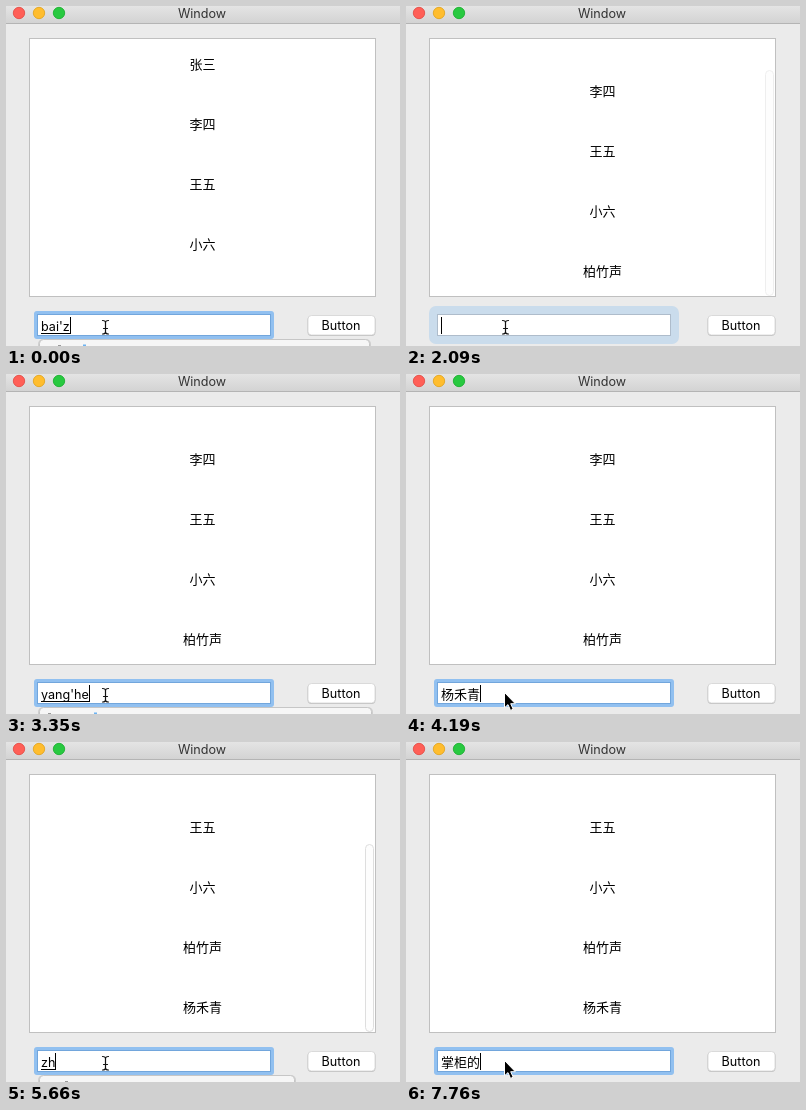
Recreate the animation shown at these times as an HTML page. Size 394 by 340 pixels, loop 7970 ms.

```html
<!DOCTYPE html>
<html lang="zh-CN">
<head>
<meta charset="utf-8">
<title>Window</title>
<style>
html, body { margin: 0; width: 100%; height: 100%; overflow: hidden; background: #ebebeb; }
svg { display: block; }
text { font: 12.6px Inter, "Noto Sans CJK SC", "Noto Sans CJK", sans-serif; fill: #000; }
.cjk { font: 13px "Noto Sans CJK SC", "Noto Sans CJK", sans-serif; }
.mid { text-anchor: middle; }
</style>
</head>
<body>
<svg width="394" height="340" viewBox="0 0 394 340">
  <defs>
    <linearGradient id="bar" x2="0" y2="1">
      <stop offset="0" stop-color="#e4e4e4"/>
      <stop offset="1" stop-color="#d3d3d3"/>
    </linearGradient>
    <clipPath id="view"><rect x="24" y="33" width="345" height="257"/></clipPath>
  </defs>
  <rect width="394" height="340" fill="#ebebeb"/>
  <rect width="394" height="17" fill="url(#bar)"/>
  <rect y="17" width="394" height="1" fill="#b4b4b4"/>
  <g stroke-width=".8">
    <circle cx="13" cy="7" r="5.7" fill="#ff5f57" stroke="#e2463f"/>
    <circle cx="33" cy="7" r="5.7" fill="#ffbd2e" stroke="#e1a116"/>
    <circle cx="53" cy="7" r="5.7" fill="#28c940" stroke="#12ac28"/>
  </g>
  <text class="mid" x="196" y="11.5" style="fill:#333">Window</text>

  <rect x="23.5" y="32.5" width="346" height="258" fill="#fff" stroke="#c0c0c0"/>
  <g clip-path="url(#view)"><g id="rows"></g></g>
  <rect id="knob" x="359.5" width="8" rx="4" fill="#fdfdfd" stroke="#dedede"/>

  <rect x="301.5" y="310" width="68" height="20" rx="4" fill="#c4c4c4"/>
  <rect x="302" y="309.5" width="67" height="19.5" rx="3.5" fill="#fff" stroke="#cfcfcf" stroke-width=".7"/>
  <text class="mid" x="335" y="324">Button</text>

  <rect id="ring"/>
  <rect id="field" x="31.5" y="308.5" width="233" height="21" fill="#fff"/>
  <text id="entry" x="35" y="325"></text>
  <rect id="under" x="35" y="327" height="1"/>
  <rect id="caret" y="311" width="1" height="17"/>

  <g id="popup">
    <rect id="shade" x="32" y="333" height="30" rx="5" fill="#000" opacity=".12"/>
    <rect id="panel" x="33.5" y="333.5" height="30" rx="4" fill="#f6f6f6" stroke="#c6c6c6"/>
    <rect id="dark" y="339" width="3" height="1" fill="#999"/>
    <rect id="blue" y="338.5" width="3" height="1.5" fill="#6db3f2"/>
  </g>

  <g id="beam" fill="none" stroke-linecap="round">
    <path id="beamPath" d="M96.5 314.5Q99.5 314.5 99.5 316.5Q99.5 314.5 102.5 314.5M99.5 316V326M97.5 322.5H101.5M96.5 328Q99.5 328 99.5 326Q99.5 328 102.5 328" stroke="#111" stroke-width="1.2"/>
  </g>
  <path id="arrow" d="M98.5 318.5V333.8L102 330.6L104.5 336.4L107.2 335.2L104.7 329.7H109.3Z" fill="#000" stroke="#fff" stroke-width="1"/>
</svg>
<script>
const LOOP = 7970;
const $ = id => document.getElementById(id);
const set = (el, attrs) => { for (const k in attrs) el.setAttribute(k, attrs[k]); };
const show = (el, on) => el.setAttribute('visibility', on ? 'visible' : 'hidden');

const names = ['张三', '李四', '王五', '小六', '柏竹声', '杨禾青'];
const rows = $('rows');
names.forEach((name, i) => {
  const t = document.createElementNS('http://www.w3.org/2000/svg', 'text');
  set(t, { class: 'cjk mid', x: 196.5, y: 63 + i * 60 });
  t.textContent = name;
  rows.append(t);
});

// Shorthands for the two input modes: composing with a candidate panel, or plain text.
const typing = (text, panel, dark, blue) => ({ text, panel, dark, blue, caret: 1 });
const plain = text => ({ text, panel: 0, caret: 1 });

// Each step keeps what the one before it left unchanged.
const steps = [
  [0, { ...typing("bai'z", 364, 52, 77), scroll: 0, count: 4, knob: 0, ring: 'tight', arrow: 0 }],
  [630, typing("bai'zhu's", 420, 56, 98)],
  [1250, plain(names[4])],
  [1670, { caret: 0 }],
  [1880, { ...plain(''), scroll: 33, count: 5, ring: 'none' }],
  [2090, { ring: 'wide', knob: .5 }],
  [2300, { ring: 'tight', knob: 1 }],
  [2510, { caret: 0 }],
  [2720, typing('ya', 334, 42, 59)],
  [2930, { ...typing('yan', 350, 42, 64), knob: .5 }],
  [3140, { ...typing("yang'h", 345, 42, 76), knob: 0 }],
  [3350, typing("yang'he", 366, 42, 88)],
  [3770, typing("yang'he'q", 420, 42, 102)],
  [4190, { ...plain(names[5]), arrow: 1 }],
  [4820, { caret: 0, arrow: 0 }],
  [5030, { ...plain(''), scroll: 93, count: 6, knob: .5 }],
  [5240, { knob: 1 }],
  [5660, typing('zh', 289, 59, 0)],
  [5870, { ...typing('zhan', 300, 59, 0), knob: .5 }],
  [6080, { ...typing('zhang', 312, 59, 0), knob: 0 }],
  [6290, typing("zhang'g", 320, 59, 0)],
  [6500, typing("zhang'gu", 324, 59, 0)],
  [6710, { text: "zhang'gui" }],
  [7130, { caret: 0 }],
  [7550, plain('掌柜的')],
  [7760, { arrow: 1 }]
];

const rings = {
  tight: { x: 28, y: 305, width: 240, height: 28, rx: 3, fill: '#91c0f0', edge: '#72a6dc' },
  wide: { x: 23, y: 300, width: 250, height: 38, rx: 7, fill: '#cadcec', edge: '#aebccb' },
  none: { x: 31, y: 308, width: 234, height: 22, rx: 0, fill: '#ebebeb', edge: '#b9b9b9' }
};

function draw(time) {
  const s = {};
  for (const [at, change] of steps) if (at <= time) Object.assign(s, change);

  rows.setAttribute('transform', `translate(0 ${-s.scroll})`);
  [...rows.children].forEach((row, i) => show(row, i < s.count));
  const top = s.count > 5 ? 102.5 : 64.5;
  set($('knob'), { y: top, height: 289.5 - top, opacity: s.knob });

  const { edge, ...ring } = rings[s.ring];
  set($('ring'), ring);
  $('field').setAttribute('stroke', edge);

  const entry = $('entry');
  entry.textContent = s.text;
  entry.setAttribute('class', s.panel ? '' : 'cjk');
  const width = s.text ? Math.round(entry.getComputedTextLength()) : 0;
  $('under').setAttribute('width', s.panel ? width : 0);
  $('caret').setAttribute('x', 35 + width);
  show($('caret'), s.caret);

  $('popup').setAttribute('display', s.panel ? 'inline' : 'none');
  if (s.panel) {
    $('shade').setAttribute('width', s.panel - 31);
    $('panel').setAttribute('width', s.panel - 34);
    $('dark').setAttribute('x', s.dark);
    $('blue').setAttribute('x', s.blue);
    show($('blue'), s.blue);
  }
  show($('beam'), !s.arrow);
  show($('arrow'), s.arrow);
}

function tick() {
  draw(performance.now() % LOOP);
  requestAnimationFrame(tick);
}
tick();
</script>
</body>
</html>
```
